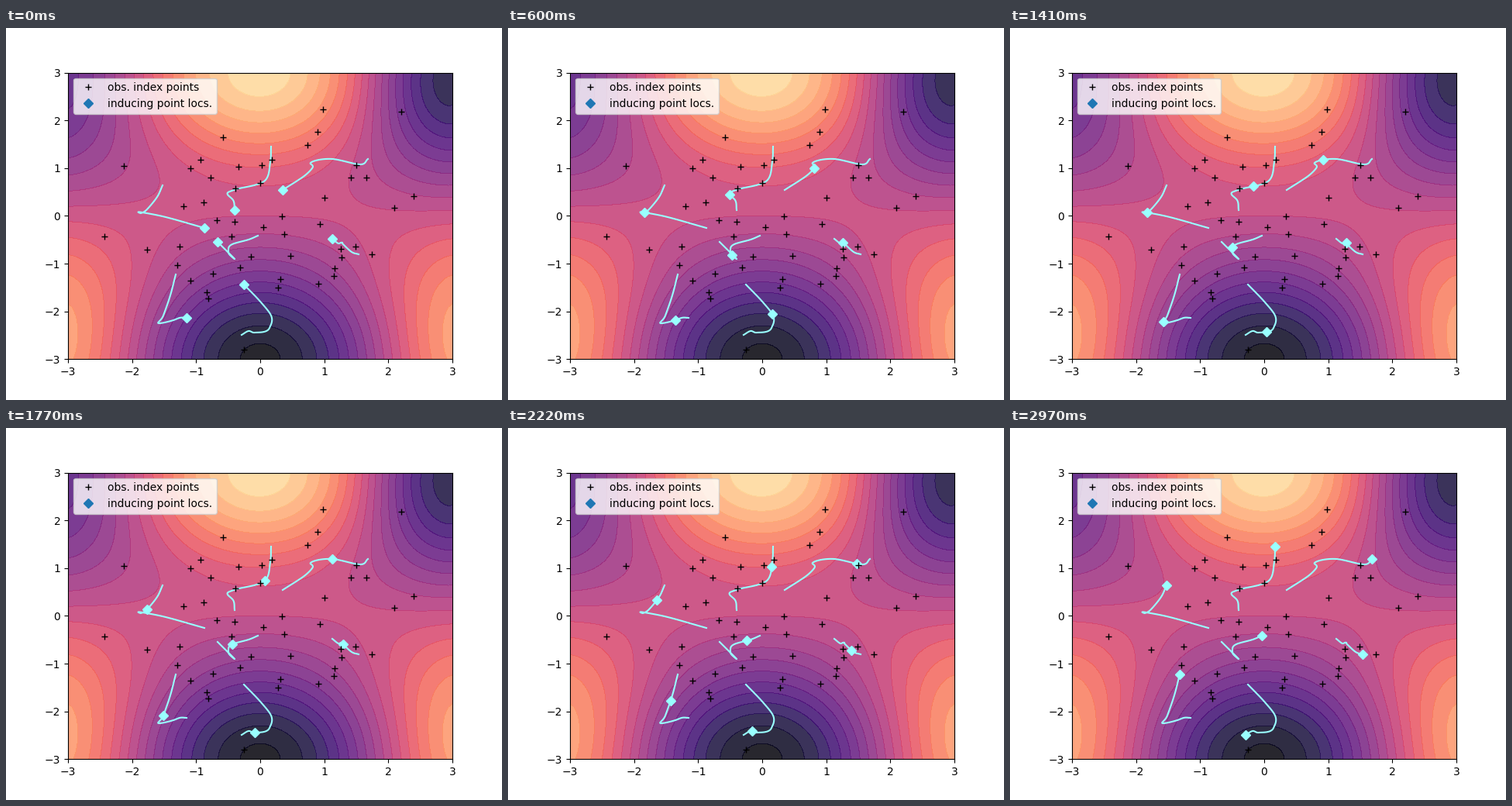
Write a matplotlib script that moves like this. It is 640x480 px and loops after 3000 ms.

```python
import numpy as np
import matplotlib.pyplot as plt
from matplotlib.animation import FuncAnimation

FRAMES, STEP_MS = 100, 30
CYAN = "#99ffff"

# Key positions of the inducing points, in stage pixels
KEY_STEPS = np.array([0, 12, 20, 35, 59, 79, 99])
KEYS = np.array([
    [(357, 209), (386, 190), (395, 181), (393, 174), (421, 169), (457, 176), (467, 169)],
    [(295, 235), (293, 222), (286, 215), (294, 209), (334, 197), (341, 173), (342, 153)],
    [(256, 258), (202, 243), (176, 238), (174, 239), (182, 234), (195, 218), (202, 203)],
    [(233, 374), (224, 374), (216, 377), (198, 381), (203, 371), (212, 345), (219, 318)],
    [(273, 276), (295, 298), (289, 293), (287, 287), (292, 279), (313, 273), (325, 268)],
    [(421, 272), (429, 278), (432, 277), (434, 277), (435, 279), (446, 289), (455, 292)],
    [(307, 331), (329, 354), (341, 369), (340, 387), (321, 393), (313, 391), (304, 396)],
])


def height(x, y):
    """Central ridge and valley blended into the opposite wave at the sides."""
    ridge = (8.1 * np.sin(np.pi * y / 6) - 1.4 * np.sin(np.pi * y / 2)
             - 0.8 * (1 - np.exp(-2 * y ** 2)))
    side = -5.4 * np.sin(np.pi * (y - 0.2) / 5.4)
    blend = np.maximum(np.cos(np.pi * x / 6), 0) ** 1.45
    dip = 3.6 * np.exp(-((x - 2.6) / 1.1) ** 2 - ((y - 2.8) / 1.7) ** 2)
    return blend * ridge + (1 - blend) * side - dip


def smooth_path(t, knots, keys):
    """Cubic Hermite curve through keys, shaped (path, knot, xy)."""
    slopes = np.gradient(keys, knots, axis=1)
    i = np.clip(np.searchsorted(knots, t, side="right") - 1, 0, len(knots) - 2)
    h = (knots[i + 1] - knots[i])[:, None]
    s = (t - knots[i])[:, None] / h
    return ((1 + 2 * s) * (1 - s) ** 2 * keys[:, i]
            + s * (1 - s) ** 2 * h * slopes[:, i]
            + s ** 2 * (3 - 2 * s) * keys[:, i + 1]
            + s ** 2 * (s - 1) * h * slopes[:, i + 1])


# Stage pixels to data: the axes centre is (328, 242.4), y points up
origin, unit = np.array([328, 242.4]), np.array([496 / 6, -369.6 / 6])
paths = (smooth_path(np.arange(FRAMES), KEY_STEPS, KEYS.astype(float)) - origin) / unit

obs_points = np.random.RandomState(123).normal(size=(50, 2))
x, y = np.meshgrid(np.linspace(-3, 3, 100), np.linspace(-3, 3, 100))

fig, ax = plt.subplots(figsize=(6.4, 4.8), dpi=100)
ax.contourf(x, y, height(x, y), levels=np.arange(-11, 11), cmap="magma",
            vmin=-10.9, vmax=10.3, alpha=0.85)
ax.plot(paths[..., 0].T, paths[..., 1].T, color=CYAN, lw=1.5, zorder=2)
points, = ax.plot(*paths[:, 0].T, "D", color=CYAN, zorder=3)
obs, = ax.plot(*obs_points.T, "k+", zorder=4, label="obs. index points")
locs, = ax.plot([], [], "D", color="C0", label="inducing point locs.")
ax.legend(handles=[obs, locs], loc="upper left")
ax.set(xlim=(-3, 3), ylim=(-3, 3))


def update(i):
    points.set_data(*paths[:, i].T)
    return points,


anim = FuncAnimation(fig, update, frames=FRAMES, interval=STEP_MS,
                     repeat=True, repeat_delay=0)
plt.show()
```
